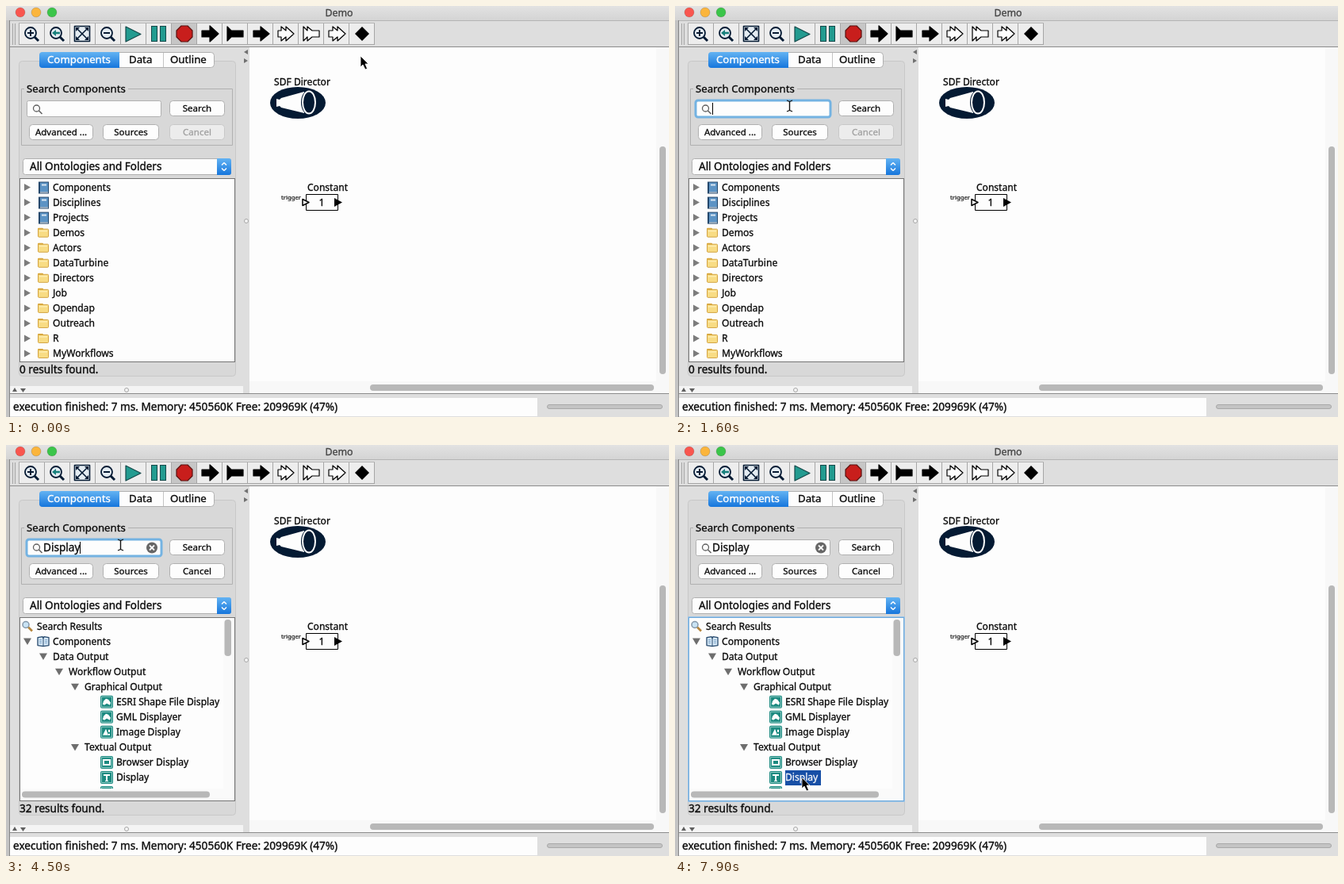
An HTML page with a canvas for the animation above (8 s loop, 836 px wide and 518 px high).

```html
<!DOCTYPE html>
<html lang="en">
<head>
<meta charset="utf-8">
<title>Workflow demo</title>
<style>
  html, body { margin: 0; width: 100%; height: 100%; overflow: hidden; background: #dedede; }
  canvas { display: block; width: 836px; height: 518px; }
</style>
</head>
<body>
<canvas id="stage" width="836" height="518"></canvas>
<script>
const ctx = document.getElementById('stage').getContext('2d');
const LOOP = 8000;
const PANEL = '#dedede', PAPER = '#fdfdfd', INK = '#0c0c0c', NAVY = '#041a33', BORDER = '#b0b0b0';
const FOCUS_AT = 1500, RESULTS_AT = 4500, PICK_AT = 6900;
const WORD = 'Display';
const KEYS = [2000, 2500, 2800, 3100, 3500, 3750, 4050];

// Cursor stops: time, x, y
const PATH = [
  [0, 447, 63], [150, 447, 63], [1100, 175, 119], [1400, 144, 126],
  [5900, 144, 126], [6700, 160, 419], [8000, 160, 419]
];

const TREE = ['Components', 'Disciplines', 'Projects', 'Demos', 'Actors', 'DataTurbine',
  'Directors', 'Job', 'Opendap', 'Outreach', 'R', 'MyWorkflows'];
const RESULTS = [
  [0, 'find', 'Search Results'], [1, 'book', 'Components'], [1, '', 'Data Output'],
  [2, '', 'Workflow Output'], [3, '', 'Graphical Output'],
  [5, 'map', 'ESRI Shape File Display'], [5, 'map', 'GML Displayer'], [5, 'image', 'Image Display'],
  [3, '', 'Textual Output'], [5, 'web', 'Browser Display'], [5, 'text', 'Display'], [5, 'map', '']
];

// A hairline stroke gives the slightly heavy look of the interface type
function text(str, x, y, size, color = INK, align = 'left') {
  ctx.font = `${size}px "Noto Sans", "Open Sans", sans-serif`;
  ctx.textAlign = align;
  ctx.fillStyle = ctx.strokeStyle = color;
  ctx.lineWidth = size * .026;
  ctx.fillText(str, x, y);
  ctx.strokeText(str, x, y);
}

function rect(x, y, w, h, color) {
  ctx.fillStyle = color;
  ctx.fillRect(x, y, w, h);
}

function box(x, y, w, h, color, width = 1) {
  ctx.strokeStyle = color;
  ctx.lineWidth = width;
  ctx.strokeRect(x, y, w, h);
}

function paint(fill, stroke, width = 1) {
  if (fill) { ctx.fillStyle = fill; ctx.fill(); }
  if (stroke) { ctx.strokeStyle = stroke; ctx.lineWidth = width; ctx.stroke(); }
}

function round(x, y, w, h, r, fill, stroke, width) {
  ctx.beginPath();
  ctx.roundRect(x, y, w, h, r);
  paint(fill, stroke, width);
}

function oval(x, y, rx, ry, fill, stroke, width) {
  ctx.beginPath();
  ctx.ellipse(x, y, rx, ry, 0, 0, Math.PI * 2);
  paint(fill, stroke, width);
}

const circle = (x, y, r, ...style) => oval(x, y, r, r, ...style);

function poly(pts, fill, stroke, width) {
  ctx.beginPath();
  for (let i = 0; i < pts.length; i += 2) ctx.lineTo(pts[i], pts[i + 1]);
  ctx.closePath();
  paint(fill, stroke, width);
}

function line(x1, y1, x2, y2, color, width = 1) {
  ctx.beginPath();
  ctx.moveTo(x1, y1);
  ctx.lineTo(x2, y2);
  paint(null, color, width);
}

function at(x, y, draw) {
  ctx.save();
  ctx.translate(x, y);
  draw();
  ctx.restore();
}

function vertical(y1, y2, top, bottom) {
  const g = ctx.createLinearGradient(0, y1, 0, y2);
  g.addColorStop(0, top);
  g.addColorStop(1, bottom);
  return g;
}

function lens(x, y, sign) {
  at(x, y, () => {
    line(4, 4, 9, 9, NAVY, 3);
    circle(-1, -1, 7, '#e4ecf2', NAVY, 1.8);
    if (sign === 'back') {
      line(-2, -1, 4, -1, '#17807c', 2.6);
      poly([-6, -1, -1, -5, -1, 3], '#17807c');
    } else {
      line(-5, -1, 3, -1, NAVY, 2);
      if (sign === 'plus') line(-1, -5, -1, 3, NAVY, 2);
    }
  });
}

function fitIcon(x, y) {
  at(x, y, () => {
    rect(-10, -10, 20, 20, '#e4ecf2');
    box(-9.5, -9.5, 19, 19, NAVY, 1.6);
    line(-7, -7, 7, 7, NAVY, 1.6);
    line(-7, 7, 7, -7, NAVY, 1.6);
    for (const sx of [-1, 1]) for (const sy of [-1, 1])
      poly([8 * sx, 8 * sy, 3 * sx, 8 * sy, 8 * sx, 3 * sy], NAVY);
  });
}

// Half outlines of the port shapes, mirrored about the horizontal axis
const PORTS = [
  [-10, 4, 0, 4, 0, 10, 11, 0],
  [-10, 9, -5, 4, 10, 4],
  [-9, 4, 0, 4, 0, 9, 11, 0],
  [-10, 4, -6, 4, -6, 9, 0, 4, 0, 9, 10, 0],
  [-10, 9, -5, 4, -5, 9, 1, 4, 10, 4],
  [-10, 4, -5, 4, -5, 9, 1, 4, 1, 9, 11, 0]
];

function port(x, half, fill) {
  const pts = [...half];
  for (let i = half.length - 2; i >= 0; i -= 2) pts.push(half[i], -half[i + 1]);
  at(x, 35, () => poly(pts, fill, '#000', 1.2));
}

function toolbar() {
  for (const x of [8, 11]) rect(x, 22, 1, 27, '#a4a4a4');
  rect(16, 21, 449, 28, '#ededed');
  rect(209, 22, 31, 26, '#c6c6c6');
  for (let i = 0; i < 15; i++) rect(16 + i * 32, 21, 1, 28, '#a6a6a6');
  rect(16, 21, 449, 1, '#b4b4b4');
  rect(16, 48, 449, 1, '#a6a6a6');

  lens(32, 35, 'plus');
  lens(64, 35, 'back');
  fitIcon(96, 35);
  lens(128, 35, 'minus');
  poly([151, 26, 170, 35.5, 151, 45], '#239b90', '#15494a', 1.2);
  for (const x of [183, 194]) {
    rect(x, 25, 8, 20, '#15494a');
    rect(x + 1, 26, 6, 18, '#239b90');
  }
  poly([221, 25, 229, 25, 235, 31, 235, 39, 229, 45, 221, 45, 215, 39, 215, 31], '#c81e1c', '#5b1210', 1.2);
  PORTS.forEach((half, i) => port(257 + i * 32, half, i < 3 ? '#000' : PAPER));
  poly([449, 26, 458, 35, 449, 44, 440, 35], '#000');
}

function frame() {
  rect(0, 0, 836, 518, PANEL);
  rect(0, 0, 836, 18, vertical(0, 18, '#e2e2e2', '#d4d4d4'));
  rect(0, 18, 836, 1, '#b4b4b4');
  [['#f9564f', 18], ['#fbb53c', 38], ['#3bc54a', 58]].forEach(([c, x]) => circle(x, 8, 6, c, 'rgba(60,50,40,.2)'));
  text('Demo', 420, 13, 12.4, '#444', 'center');
  toolbar();
  rect(5, 51, 831, 1, '#8c8c8c');

  // Workspace and its scroll bars
  rect(307, 52, 529, 436, PAPER);
  rect(820, 52, 16, 422, '#f8f8f8');
  rect(307, 473, 529, 15, '#f8f8f8');
  round(824, 177, 8, 287, 4, '#b8b8b8');
  round(459, 477, 358, 8, 4, '#b8b8b8');

  // Split handles
  poly([300, 58, 305, 55, 305, 61], '#707070');
  poly([305, 69, 300, 66, 300, 72], '#707070');
  circle(303, 271, 2.5, '#f4f4f4', '#a6a6a6');
  rect(5, 479, 294, 9, '#f4f4f4');
  poly([8, 486, 14, 486, 11, 481], '#606060');
  poly([18, 482, 25, 482, 21.5, 487], '#606060');
  circle(152, 484, 2.5, '#f4f4f4', '#a6a6a6');

  rect(5, 488, 831, 1, '#8c8c8c');
  rect(5, 494, 665, 23, PAPER);
  text('execution finished: 7 ms. Memory: 450560K Free: 209969K (47%)', 9, 510, 13.6);
  round(682.5, 502.5, 145, 5, 2.5, '#c4c4c4', '#a8a8a8');
  rect(0, 18, 4, 500, '#c4c4c4');
  rect(4, 18, 1, 500, '#848484');
}

function workspace() {
  text('SDF Director', 338, 100, 12.1);
  oval(368, 122, 35, 20, NAVY);
  poly([341, 117, 345, 118, 347, 116, 376, 108, 376, 135, 347, 128, 345, 126, 341, 127], PAPER);
  oval(382, 121.5, 10, 15.5, NAVY);
  oval(382, 121.5, 8, 14, null, PAPER, 2);

  text('Constant', 380, 233, 12.05);
  text('trigger', 347, 244, 7.7);
  box(378.5, 237.5, 40, 20, '#000');
  text('1', 398, 252, 12.5, INK, 'center');
  poly([374, 243.5, 382, 247.5, 374, 251.5], PAPER, '#000', 1.5);
  poly([414, 242, 424, 247.5, 414, 253], '#000');
}

function button(label, x, y, w, enabled = true) {
  round(x + .5, y + .5, w - 1, 19, 4, enabled ? PAPER : '#ececec', enabled ? BORDER : '#c8c8c8');
  text(label, x + w / 2, y + 14, 11.5, enabled ? INK : '#a0a0a0', 'center');
}

function searchPanel(t) {
  round(16.5, 69.5, 273, 397, 4, 'rgba(120,120,120,.06)', '#c8c8c8');

  round(42.5, 58.5, 220, 19, 4, PAPER, BORDER);
  round(42, 58, 101, 20, [4, 0, 0, 4], vertical(58, 78, '#63b3f3', '#1676dc'));
  rect(198, 59, 1, 18, '#c4c4c4');
  text('Components', 52, 72, 13.25, '#fff');
  text('Data', 155, 72, 13.25);
  text('Outline', 207, 72, 13.25);

  box(19.5, 104.5, 266, 71, BORDER);
  rect(23, 100, 131, 10, '#d8d8d8');
  text('Search Components', 26, 109, 13.2);

  const focus = t >= FOCUS_AT && t < PICK_AT;
  if (focus) round(26, 119, 170, 21, 3, PAPER, '#74b3e2', 3);
  else round(26.5, 119.5, 169, 20, 2, PAPER, BORDER);
  circle(38.5, 129, 4, null, '#606060', 1.3);
  line(41.5, 132, 45.5, 136, '#606060', 1.6);

  const typed = WORD.slice(0, KEYS.filter(k => t >= k).length);
  text(typed, 47, 134, 13.6);
  if (focus && (t < 4600 || Math.floor((t - 4600) / 500) % 2)) {
    rect(Math.round(47 + ctx.measureText(typed).width), 122, 1, 15, '#000');
  }
  if (typed) {
    circle(184, 129.5, 7, '#666');
    line(181, 126.5, 187, 132.5, PAPER, 1.8);
    line(187, 126.5, 181, 132.5, PAPER, 1.8);
  }

  button('Search', 206, 119, 70);
  button('Advanced ...', 29, 149, 81);
  button('Sources', 122, 149, 71);
  button('Cancel', 206, 149, 70, t >= RESULTS_AT);

  round(21.5, 192.5, 262, 20, 3, PAPER, BORDER);
  round(266, 192, 18, 21, [0, 3, 3, 0], vertical(192, 213, '#63b3f3', '#1676dc'));
  for (const s of [-1, 1]) {
    line(272, 202.5 + 2 * s, 275, 202.5 + 5 * s, '#fff', 1.5);
    line(278, 202.5 + 2 * s, 275, 202.5 + 5 * s, '#fff', 1.5);
  }
  text('All Ontologies and Folders', 30, 207, 13.5);
}

function icon(kind, x, y) {
  at(x, y, () => {
    if (kind === 'folder') {
      round(-7, -6, 7, 4, 1, '#dba83a');
      round(-6.5, -4.5, 13, 10, 1, '#f8dc84', '#d3a444');
      line(-5, -2, 5, -2, '#fff3c4');
    } else if (kind === 'shelf') {
      rect(-6, -7, 13, 15, '#24476b');
      rect(-4, -6, 10, 12, '#5c93c4');
      rect(-2, -4, 6, 2, '#d8e6f2');
      rect(-4, 6, 10, 1, '#ececec');
    } else if (kind === 'book') {
      poly([-7, -5, -1, -6, 0, -4, 1, -6, 7, -5, 7, 5, 0, 6, -7, 5], '#d6e8f7', '#24476b', 1.3);
      line(0, -4, 0, 6, '#24476b');
      for (const dy of [-2, 0, 2]) {
        line(-5, dy, -2, dy, '#7fa6c8');
        line(2, dy, 5, dy, '#7fa6c8');
      }
    } else if (kind === 'find') {
      line(1, 1, 6, 6, '#b5853c', 2.6);
      circle(-2, -2, 4, '#c9e3f4', '#8497a8', 1.5);
    } else {
      round(-8, -8, 16, 16, 2, '#1c8a80');
      box(-6.5, -6.5, 13, 13, '#8ecac4');
      if (kind === 'text') {
        rect(-4, -4, 8, 2, '#fff');
        rect(-1, -4, 2, 9, '#fff');
        rect(-2, 4, 4, 1, '#fff');
      } else if (kind === 'web') {
        rect(-5, -4, 10, 8, '#fff');
        rect(-3, -2, 6, 4, '#1c8a80');
      } else if (kind === 'image') {
        poly([-5, 4, -1, -4, 2, 4], '#fff');
        rect(2, -3, 2, 3, '#fff');
        rect(2, 2, 2, 2, '#fff');
      } else {
        poly([-5, 3, -4, -1, -1, -4, 2, -3, 5, 1, 4, 4, 0, 2, -3, 4], '#fff');
      }
    }
  });
}

const rowY = i => 228.5 + i * 19.05;

function browseTree() {
  TREE.forEach((name, i) => {
    const y = rowY(i);
    poly([23, y - 4.5, 31, y, 23, y + 4.5], '#7c7c7c');
    icon(i < 3 ? 'shelf' : 'folder', 47, y);
    text(name, 59, Math.round(y + 4), 12.1);
  });
}

function resultTree(picked) {
  ctx.save();
  ctx.beginPath();
  ctx.rect(18, 218, 256, 215);
  ctx.clip();
  RESULTS.forEach(([depth, kind, name], i) => {
    const y = rowY(i), x = 39 + depth * 20;
    if (depth > 0 && depth < 5) {
      const ax = kind ? x - 32 : x - 12;
      poly([ax - 5, y - 4, ax + 5, y - 4, ax, y + 4.5], '#6e6e6e');
    }
    if (kind) icon(kind, x - 12, y);
    const chosen = picked && name === WORD;
    if (chosen) rect(139, 410, 45, 19, '#174fa6');
    text(name, x, Math.round(y + 4), 12.1, chosen ? '#f4f6fa' : INK);
  });
  ctx.restore();
  rect(274, 218, 14, 215, '#fafafa');
  rect(18, 433, 270, 14, '#fafafa');
  round(275.5, 220, 8.5, 46, 4, '#b8b8b8');
  round(20, 436.5, 237, 8, 4, '#b8b8b8');
}

function treePanel(t) {
  const picked = t >= PICK_AT;
  rect(17, 217, 272, 232, picked ? '#6fa9da' : '#747474');
  rect(18, 218, 270, 230, PAPER);
  if (picked) box(16.5, 216.5, 273, 233, '#9cc5e8');
  if (t < RESULTS_AT) browseTree();
  else resultTree(picked);
  text(`${t < RESULTS_AT ? 0 : 32} results found.`, 17, 463, 13.6);
}

function cursor(t) {
  const n = PATH.findIndex((p, i) => i && t < p[0]);
  const [t0, x0, y0] = PATH[n - 1], [t1, x1, y1] = PATH[n];
  const u = (t - t0) / (t1 - t0), e = u * u * (3 - 2 * u);
  const x = x0 + (x1 - x0) * e, y = y0 + (y1 - y0) * e;
  const inField = x > 26 && x < 196 && y > 116 && y < 141;
  at(Math.round(x), Math.round(y), () => {
    if (!inField) {
      poly([0, 0, 0, 14, 3, 11, 6, 17, 8.5, 16, 6, 10, 10, 10], '#000', '#fff', .8);
      return;
    }
    const color = t < 1300 ? '#777' : '#111';
    line(.5, -6, .5, 6, color, 1.4);
    for (const s of [-1, 1]) {
      line(-3, 7 * s, .5, 5.5 * s, color, 1.3);
      line(4, 7 * s, .5, 5.5 * s, color, 1.3);
    }
  });
}

function draw(now) {
  const t = now % LOOP;
  ctx.lineJoin = 'round';
  frame();
  workspace();
  searchPanel(t);
  treePanel(t);
  cursor(t);
  requestAnimationFrame(draw);
}
requestAnimationFrame(draw);
</script>
</body>
</html>
```
